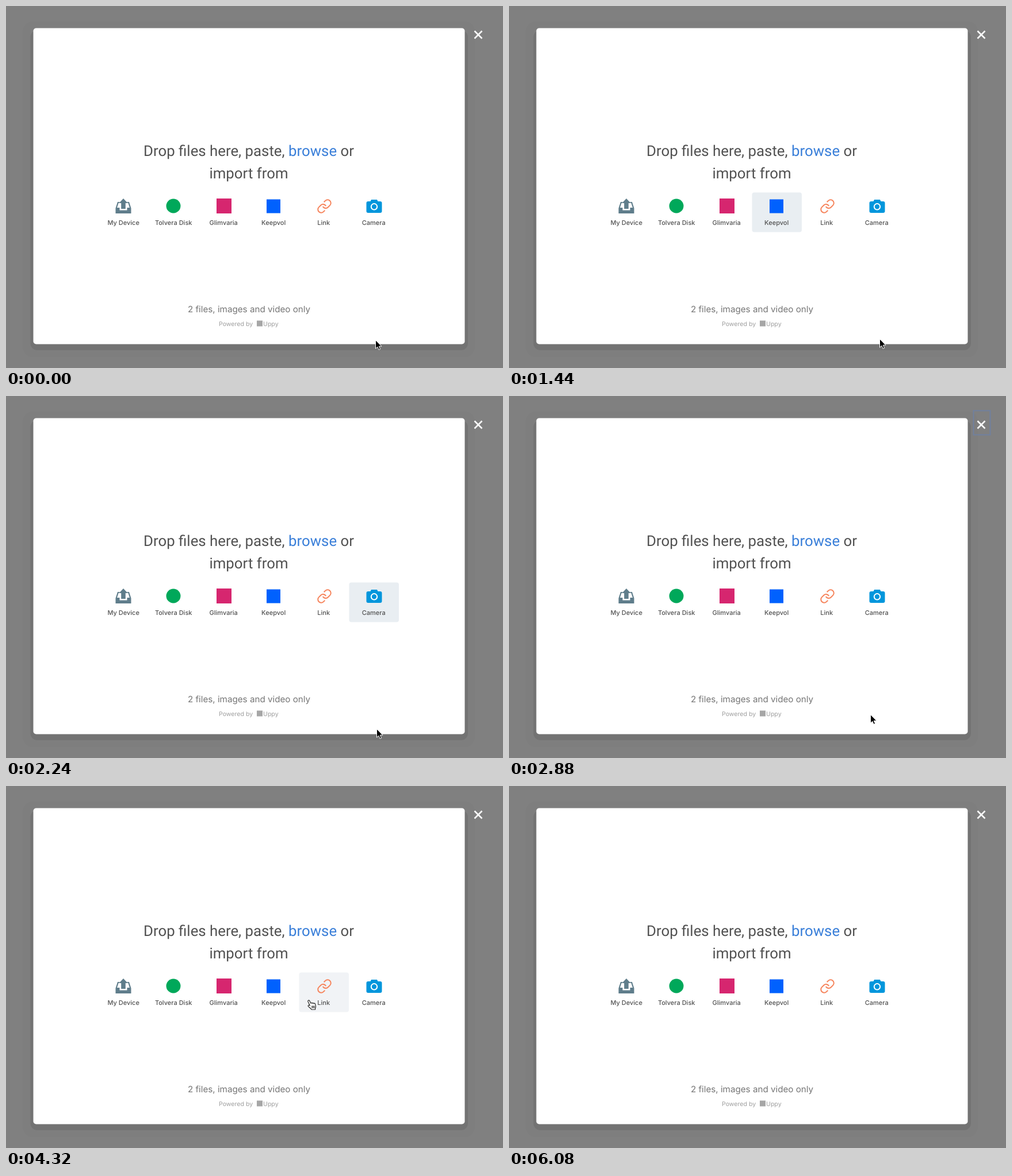
Write an HTML page that moves like this. It is 864 px wide and 630 px high and loops after 6240 ms.

```html
<!DOCTYPE html>
<html lang="en">
<head>
<meta charset="utf-8">
<title>File picker</title>
<style>
  html, body { margin: 0; width: 100%; height: 100%; overflow: hidden; background: #808080; }
  svg { display: block; }
  text { text-anchor: middle; font-family: Inter, sans-serif; text-rendering: geometricPrecision; }
  .title { font: 25.8px Roboto, sans-serif; fill: #525252; }
  .browse { fill: #3a7fd9; }
  .label { font-size: 11px; font-weight: 500; fill: #525252; }
  .note { font-size: 15.2px; fill: #757575; }
  .credit { font-size: 10.6px; fill: #9f9f9f; text-anchor: start; }
</style>
</head>
<body>
<svg width="864" height="630" viewBox="0 0 864 630">
  <rect width="864" height="630" fill="#808080"/>
  <rect x="29" y="27" width="786" height="584" rx="17" fill="#7e7e7e"/>
  <rect x="42.5" y="42" width="760.5" height="557" rx="12" fill="#737373"/>
  <rect x="47.5" y="38.5" width="750" height="550" rx="5" fill="#fff"/>

  <path d="M814.5 43.5l13 13m0-13l-13 13" stroke="#fff" stroke-width="2.5"/>
  <rect id="closeFocus" x="807.5" y="25.5" width="29" height="42" fill="none" stroke="#70809e" stroke-width="2"/>

  <text class="title" x="422" y="260.5">Drop files here, paste, <tspan class="browse">browse</tspan> or</text>
  <rect id="browseFocus" x="492" y="264" width="85" height="1" fill="#3a7fd9"/>
  <text class="title" x="422" y="299.5">import from</text>

  <g id="cells"></g>

  <g fill="#5f7d8b">
    <path d="M194 341h20l3.5 11v9h-27v-9z"/>
    <path d="M195.6 343h16.8l2.6 8h-4.5v4.5h-13V351H193z" fill="#fff"/>
    <path d="M204 335l7.5 8h-3.7v10h-7.6v-10h-3.7z" stroke="#fff" stroke-width=".7" paint-order="stroke"/>
  </g>
  <circle cx="291" cy="348" r="12.5" fill="#00a85a"/>
  <rect x="366" y="335" width="26" height="26" fill="#d6266f"/>
  <rect x="453" y="336.5" width="24" height="24" fill="#0061fe"/>
  <g transform="translate(553.5 348.5) scale(1.13) translate(-12 -12)" fill="none" stroke="#f6855d" stroke-width="1.8" stroke-linecap="round">
    <path d="M10 13a5 5 0 0 0 7.54.54l3-3a5 5 0 0 0-7.07-7.07l-1.72 1.71"/>
    <path d="M14 11a5 5 0 0 0-7.54-.54l-3 3a5 5 0 0 0 7.07 7.07l1.71-1.71"/>
  </g>
  <g fill="#0096dc">
    <path d="M629.5 340h4l1.5-3h10l1.5 3h4q3 0 3 3v14q0 3-3 3h-21q-3 0-3-3v-14q0-3 3-3z"/>
    <circle cx="640" cy="349.3" r="5.2" stroke="#fff" stroke-width="2"/>
  </g>
  <g id="labels"></g>

  <text class="note" x="422.5" y="532.5">2 files, images and video only</text>
  <text class="credit" x="370" y="556.5">Powered by</text>
  <rect x="436" y="547.5" width="10" height="10" fill="#a6a6a6"/>
  <text class="credit" x="447" y="556.5">Uppy</text>

  <g id="cursor" stroke-linejoin="round">
    <path id="arrow" d="M.5 .5v14.7l3.3-3.1 2.3 5.2 2.5-1.1-2.3-5h4.6z" fill="#000" stroke="#fff"/>
    <path id="hand" d="M4.3 10L1 3.2C.2 1 2.7 0 3.7 1.8L6 6.2c.3-1.3 2-1.3 2.5 0 .5-1 2-.8 2.4.4.7-.8 2.2-.5 2.5.6l1 3.6c.4 1.8-.2 3-.8 4.2v2H7c-.7-2-3.3-3-5.4-5.3C.2 10 2.6 8.6 4.3 10zM8 10.5v4m2-4v4m2-4v4" fill="#fff" stroke="#222" stroke-width="1.2"/>
  </g>
</svg>
<script>
const LOOP = 6240, STEP = 160;
const CELL = { x: 161.5, y: 324.5, pitch: 87, width: 86.5, height: 69 };
const sources = ["My Device", "Tolvera Disk", "Glimvaria", "Keepvol", "Link", "Camera"];

// Keyboard focus: start time and focused element (a number is a cell index).
const focusSteps = [
  [0, ""], [160, "browse"], [320, 0], [800, 1], [1120, 2], [1440, 3],
  [1760, 4], [2240, 5], [2560, "close"], [3200, ""]
];

// Pointer: time, x, y.
const pointerPath = [
  [0, 642, 581], [160, 644, 579], [2560, 644, 579], [2880, 628, 554],
  [3200, 631, 545], [3520, 645, 536], [3680, 651, 500], [3840, 650, 430],
  [4000, 644, 380], [4160, 644, 380], [4320, 524, 372], [5280, 192, 380],
  [5440, 225, 402], [5920, 504, 610], [6080, 520, 640], [LOOP, 520, 640]
];

const byId = id => document.getElementById(id);
const show = (id, on) => byId(id).setAttribute("visibility", on ? "visible" : "hidden");

function add(parent, tag, attributes) {
  const node = document.createElementNS("http://www.w3.org/2000/svg", tag);
  for (const [key, value] of Object.entries(attributes)) node.setAttribute(key, value);
  return byId(parent).appendChild(node);
}

const cells = sources.map((name, i) => {
  const x = CELL.x + CELL.pitch * i;
  add("labels", "text", { class: "label", x: x + 42.7, y: 380.5 }).textContent = name;
  return add("cells", "rect", { x, y: CELL.y, width: CELL.width, height: CELL.height, rx: 4 });
});

function pointerAt(time) {
  const next = pointerPath.findIndex(point => point[0] > time);
  const [t0, x0, y0] = pointerPath[next - 1];
  const [t1, x1, y1] = pointerPath[next];
  const k = (time - t0) / (t1 - t0);
  return [x0 + (x1 - x0) * k, y0 + (y1 - y0) * k];
}

function hoveredCell(x, y) {
  if (y < CELL.y || y > CELL.y + CELL.height) return -1;
  const i = Math.floor((x - CELL.x) / CELL.pitch);
  return i < cells.length ? i : -1;
}

function draw(now) {
  const time = Math.floor((now % LOOP) / STEP) * STEP;
  const focus = focusSteps.filter(([start]) => start <= time).pop()[1];
  const [x, y] = pointerAt(time);
  const hovered = hoveredCell(x, y);

  cells.forEach((cell, i) =>
    cell.setAttribute("fill", i === focus ? "#e9eef2" : i === hovered ? "#f1f3f6" : "none"));
  show("browseFocus", focus === "browse");
  show("closeFocus", focus === "close");
  show("arrow", hovered < 0);
  show("hand", hovered >= 0);
  byId("cursor").setAttribute("transform", `translate(${Math.round(x)} ${Math.round(y)})`);
}

let startTime;
function tick(now) {
  startTime ??= now;
  draw(now - startTime);
  requestAnimationFrame(tick);
}
draw(0);
requestAnimationFrame(tick);
</script>
</body>
</html>
```
